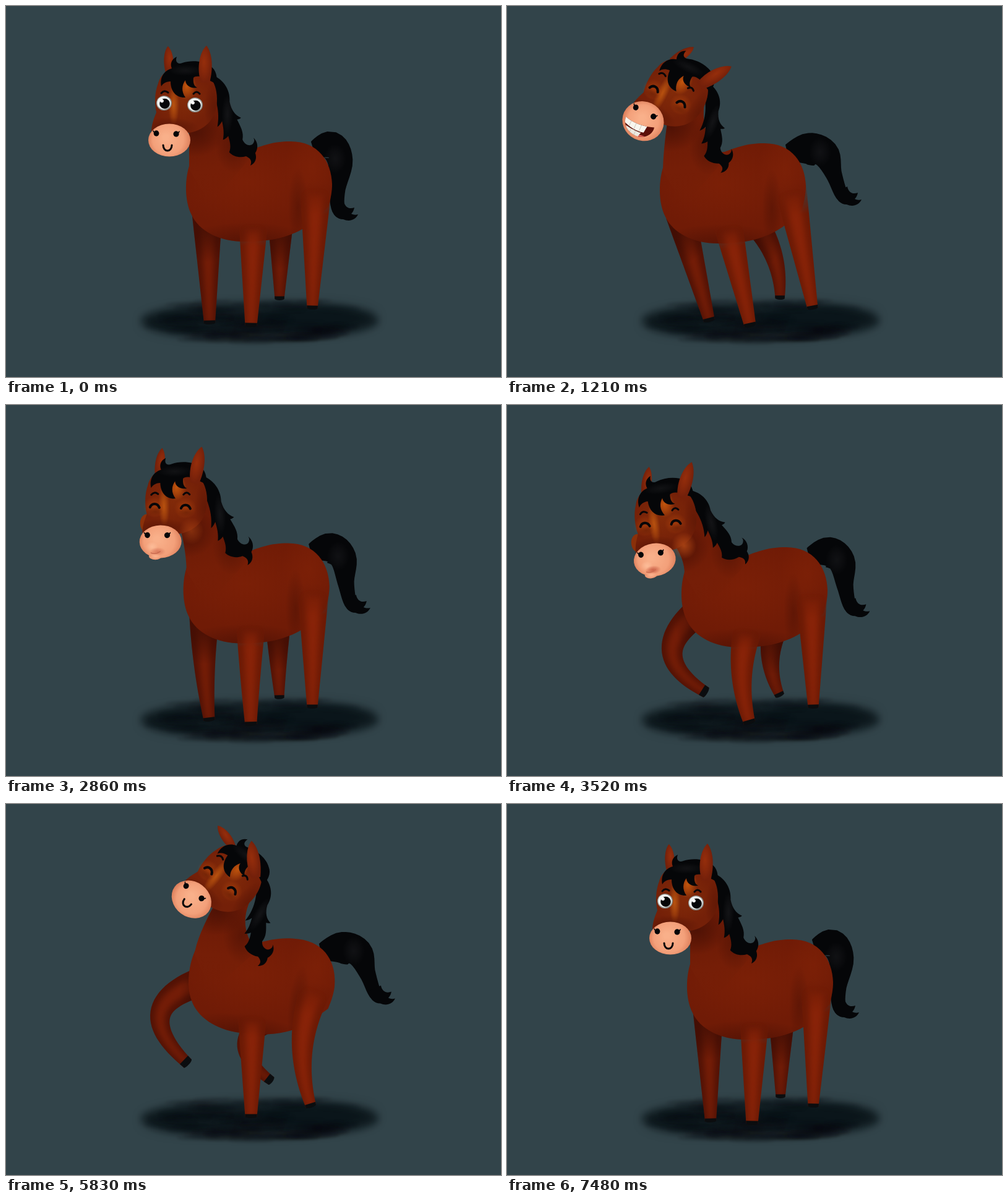
Recreate the animation shown at these times as an HTML page with a canvas. Size 800 by 600 pixels, loop 7590 ms.

```html
<!DOCTYPE html>
<html lang="en">
<head>
<meta charset="utf-8">
<title>Little horse</title>
<style>
html, body { margin: 0; width: 100%; height: 100%; overflow: hidden; background: #32444a; }
canvas { display: block; }
</style>
</head>
<body>
<canvas id="stage" width="800" height="600"></canvas>
<script>
const LOOP = 7590, STEP = 110;
const ctx = document.getElementById('stage').getContext('2d');
const INK = '#050608';
const PIVOT = [470, 300], FACE = [280.5, 158.5];
const MANE_TOP = [340, 120], MANE_END = [385, 235];
const HIPS = { fl: [325, 335], fr: [400, 345], hl: [444, 345], hr: [501, 285] };

// body and head: x, y, degrees; legs: foot x, foot y, bend
const rest = {
  body: [0, 0, 0], head: [280.5, 158.5, 0], ears: [0, 0], mane: [385, 235], tail: [0],
  fl: [329, 513, 0], fr: [396, 517, 0], hl: [442, 474, 0], hr: [495, 489, 0],
  grin: [0], puff: [0]
};
const pose = p => ({ ...rest, ...p });

const lift = pose({ head: [274, 149, 4], ears: [10, 8], body: [-6, -2, 0], tail: [0.45], mane: [379, 232] });
const lean = pose({
  body: [-44, 3, 0], head: [260.5, 143.5, 25.5], ears: [34, 31], mane: [342, 247], tail: [1],
  fl: [327, 509, 0], fr: [393, 517, 0], hl: [441, 473, -12], hr: [494, 489, 0], grin: [1]
});
const back = pose({ body: [-9, 3, 0], head: [267, 153, 10], ears: [20, 16], mane: [375, 238], tail: [0.95] });
const stepRight = pose({
  body: [-9, 11, 0], head: [254, 185, 6], ears: [26, 11], mane: [371, 239], tail: [0.52],
  fl: [325, 506, 16], fr: [389, 483, 44]
});
const between = pose({
  body: [-4, 4, 0], head: [266, 160, -1], ears: [12, 10], mane: [379, 236], tail: [0.5], puff: [0.6]
});
const stepLeft = pose({
  body: [-9, 11, 0], head: [247, 190, -8], ears: [20, 22], mane: [370, 239], tail: [0.55],
  fl: [322, 465, 52], fr: [392, 514, 12], hl: [441, 470, 12], puff: [1]
});
const blow = pose({ body: [0, 5, 0], head: [281, 165, 0], ears: [-30, -12], mane: [385, 240], tail: [0.32], puff: [1] });
const dip = pose({ body: [2, 5, 0], head: [284, 163, 3], ears: [-15, -8], mane: [386, 239], tail: [0.35] });
const rise = pose({
  body: [3, 0, 7], head: [348, 121, 37], ears: [-70, -46], mane: [408, 239], tail: [1],
  fl: [294, 420, 61], fr: [396, 506, 0], hl: [429, 448, 48], hr: [493, 489, 20]
});
const rear = pose({
  body: [2, -6, 26], head: [362, 72, 24], ears: [-22, -18], mane: [420, 180], tail: [0.1],
  fl: [228, 335, 50], fr: [292, 402, 45], hr: [495, 489, 6]
});
const kick = { ...rear, head: [358, 66, 16], fl: [252, 362, 58], fr: [262, 372, 42], tail: [0.2] };
const land = pose({ body: [0, 9, 0], head: [280, 172, -3], ears: [10, 6], mane: [385, 242], tail: [0.22] });

const keys = [
  [0, rest], [110, rest], [330, lift], [770, lean], [1210, lean], [1540, back], [2200, stepRight],
  [2750, between], [3410, stepLeft], [3520, stepLeft], [4070, blow], [4510, blow], [5060, { ...rest, tail: [0.25] }],
  [5500, dip], [5830, rise], [6270, rear], [6600, kick], [6930, rear], [7260, land], [7480, rest], [LOOP, rest]
];

function poseAt(t) {
  let i = 1;
  while (keys[i][0] < t) i++;
  const [t0, a] = keys[i - 1], [t1, b] = keys[i];
  const k = 0.5 - Math.cos(Math.PI * (t - t0) / (t1 - t0)) / 2;
  const out = {};
  for (const n in rest) out[n] = a[n].map((v, j) => v + (b[n][j] - v) * k);
  return out;
}

const rad = d => d * Math.PI / 180;
function place([x, y], [ox, oy], [px, py, deg]) {
  const c = Math.cos(rad(deg)), s = Math.sin(rad(deg)), dx = x - ox, dy = y - oy;
  return [px + dx * c - dy * s, py + dx * s + dy * c];
}
function within(fn) { ctx.save(); fn(); ctx.restore(); }
function enter([ox, oy], [x, y, deg]) {
  ctx.translate(x, y); ctx.rotate(rad(deg)); ctx.translate(-ox, -oy);
}
function glow(x, y, rx, ry, rgb, a) {
  within(() => {
    ctx.translate(x, y); ctx.scale(rx, ry);
    const g = ctx.createRadialGradient(0, 0, 0, 0, 0, 1);
    g.addColorStop(0, `rgba(${rgb},${a})`);
    g.addColorStop(0.5, `rgba(${rgb},${a * 0.55})`);
    g.addColorStop(1, `rgba(${rgb},0)`);
    ctx.fillStyle = g;
    ctx.fillRect(-1, -1, 2, 2);
  });
}
function fillPath(d, color) { ctx.fillStyle = color; ctx.fill(new Path2D(d)); }
function line(d, w, color = INK) {
  ctx.lineWidth = w; ctx.lineCap = 'round'; ctx.strokeStyle = color; ctx.stroke(new Path2D(d));
}
function oval(x, y, rx, ry, color) {
  ctx.fillStyle = color;
  ctx.beginPath(); ctx.ellipse(x, y, rx, ry, 0, 0, 7); ctx.fill();
}

// outline of a ribbon: at(t) gives a centre point, wide(t) its width
function ribbon(at, wide, from = 0, to = 1) {
  const left = [], right = [], n = 30;
  for (let i = 0; i <= n; i++) {
    const t = from + (to - from) * i / n;
    const [x, y] = at(t), [ax, ay] = at(t - 0.004), [bx, by] = at(t + 0.004);
    const l = Math.hypot(bx - ax, by - ay) || 1, h = wide(t) / 2;
    const nx = -(by - ay) / l * h, ny = (bx - ax) / l * h;
    left.push([x + nx, y + ny]);
    right.unshift([x - nx, y - ny]);
  }
  const p = new Path2D();
  left.concat(right).forEach(q => p.lineTo(...q));
  p.closePath();
  return p;
}

function leg(hip, [fx, fy, bend], w0, w1, near) {
  const [hx, hy] = hip, dx = fx - hx, dy = fy - hy, l = Math.hypot(dx, dy);
  const cx = (hx + fx) / 2 - 2 * bend * dy / l, cy = (hy + fy) / 2 + 2 * bend * dx / l;
  const at = t => {
    const u = 1 - t;
    return [u * u * hx + 2 * u * t * cx + t * t * fx, u * u * hy + 2 * u * t * cy + t * t * fy];
  };
  const wide = t => w0 + (w1 - w0) * t;
  const shade = (rgb, a0) => {
    const g = ctx.createLinearGradient(hx, hy, hx + dx * 0.28, hy + dy * 0.28);
    g.addColorStop(0, `rgba(${rgb},${a0})`);
    g.addColorStop(near ? 0.9 : 0.3, `rgb(${rgb})`);
    return g;
  };
  const shape = ribbon(at, wide);
  within(() => {
    ctx.fillStyle = shade(near ? '108,26,5' : '82,18,5', near ? 0 : 1);
    ctx.fill(shape);
    ctx.clip(shape);
    ctx.filter = 'blur(5px)';
    ctx.fillStyle = shade(near ? '136,35,8' : '116,29,7', 0);
    ctx.fill(ribbon(at, t => wide(t) * 0.5, 0.1, 1));
    ctx.filter = 'none';
    if (!near) glow(hx, hy + 25, 45, 55, '45,8,3', 0.6);
  });
  ctx.fillStyle = '#0b0d0f';
  ctx.fill(ribbon(at, wide, 1 - 4.5 / l, 1));
  within(() => {
    ctx.translate(fx, fy);
    ctx.rotate(Math.atan2(fy - cy, fx - cx) - Math.PI / 2);
    oval(0, -0.5, w1 / 2, 2.5, '#0b0d0f');
  });
}

// a raised foreleg pulls its hip up
const raised = ([x, y], foot) => [x, y - Math.min(40, Math.max(0, 510 - foot[1]) * 0.36)];

function tail([bx, by], s) {
  const mix = (x0, y0, x1, y1) => [bx + x0 + (x1 - x0) * s, by + y0 + (y1 - y0) * s];
  const pts = [
    mix(-6, 8, -6, 10), mix(22, 0, 27, 3), mix(37, 26, 55, 12),
    mix(32, 72, 69, 44), mix(34, 105, 82, 78), mix(44, 115, 93, 87)
  ];
  const widths = [28, 45, 41, 27, 20, 10];
  const spline = (get, t) => {
    const v = Math.min(Math.max(t, 0), 0.9999) * 5, i = Math.floor(v), f = v - i;
    const [a, b, c, d] = [i - 1, i, i + 1, i + 2].map(j => get(Math.min(Math.max(j, 0), 5)));
    return b + f * (c - a + f * (2 * a - 5 * b + 4 * c - d + f * (3 * (b - c) + d - a))) / 2;
  };
  const at = t => [spline(i => pts[i][0], t), spline(i => pts[i][1], t)];
  ctx.fillStyle = INK;
  ctx.fill(ribbon(at, t => spline(i => widths[i] + (i && i < 3 ? 6 * s : 0), t)));
  within(() => {
    ctx.translate(...pts[4]);
    fillPath('M9-14C11-4 18-1 26-4C25 1 23 4 21 6C25 8 28 8 32 7C27 17 17 19 8 15C-2 15-9 8-11-5Z', INK);
  });
  glow(pts[2][0] - 8, pts[2][1] - 4, 18, 24, '38,38,42', 0.35);
}

function torso(p) {
  const pos = [PIVOT[0] + p.body[0], PIVOT[1] + p.body[1], p.body[2]];
  within(() => {
    enter(PIVOT, pos);
    const shape = new Path2D('M297 256C289 278 288 315 300 338C312 364 345 381 385 381C430 381 460 374 490 354L521 325C525 310 527 300 527 288C526 252 505 219 460 219C430 219 415 226 395 233L340 238Z');
    ctx.fillStyle = '#701b06';
    ctx.fill(shape);
    ctx.clip(shape);
    glow(390, 285, 120, 75, '138,38,8', 0.4);
    glow(495, 260, 45, 70, '138,38,8', 0.4);
    glow(390, 392, 125, 42, '60,12,4', 0.6);
    glow(472, 325, 16, 65, '70,15,4', 0.4);
  });
  const b = q => place(q, PIVOT, pos), h = q => place(q, FACE, p.head);
  const a = h([296, 192]), top = h([336, 135]), crown = h([295, 150]);
  const throat = b([296, 235]), chest = b([296, 264]), deep = b([330, 320]), wither = b([395, 246]), nape = b([352, 205]);
  const neck = new Path2D();
  neck.moveTo(...crown);
  neck.lineTo(...a);
  neck.quadraticCurveTo(...throat, ...chest);
  neck.lineTo(...deep);
  neck.lineTo(...wither);
  neck.quadraticCurveTo(...nape, ...top);
  within(() => {
    const g = ctx.createLinearGradient(...a, ...deep);
    g.addColorStop(0, '#6a1a06');
    g.addColorStop(0.6, '#751e07');
    g.addColorStop(1, 'rgba(117,30,7,0)');
    ctx.fillStyle = g;
    ctx.fill(neck);
    ctx.clip(neck);
    glow(...h([306, 204]), 48, 40, '60,12,4', 0.6);
    glow(...b([368, 225]), 30, 45, '70,15,4', 0.5);
  });
}

function mane(p) {
  const [tx, ty] = place(MANE_TOP, FACE, p.head), [ex, ey] = p.mane;
  const vx = MANE_END[0] - MANE_TOP[0], vy = MANE_END[1] - MANE_TOP[1];
  within(() => {
    ctx.translate(tx, ty);
    ctx.rotate(Math.atan2(ey - ty, ex - tx));
    ctx.scale(Math.hypot(ex - tx, ey - ty) / Math.hypot(vx, vy), 1.06);
    ctx.rotate(-Math.atan2(vy, vx));
    ctx.translate(-MANE_TOP[0], -MANE_TOP[1]);
    fillPath('M326 108C350 116 362 135 361 155C364 169 370 177 379 181C376 184 374 183 373 184C379 196 384 205 382 216C386 226 396 228 399 222C401 218 400 215 398 213C406 219 407 231 402 238C405 246 403 254 395 258C398 250 394 246 388 243C378 246 368 243 362 236C365 228 363 220 360 210C358 213 355 215 352 216C354 204 352 196 350 186C348 190 346 193 343 195C348 165 336 140 328 125Z', INK);
    glow(358, 175, 9, 32, '45,45,48', 0.35);
  });
}

function ear(x, y, size, deg) {
  within(() => {
    ctx.translate(x, y); ctx.rotate(rad(deg)); ctx.scale(size, Math.abs(size));
    const shape = new Path2D('M-7 3C-15-22-8-48 2-57C12-44 13-20 7 3Z');
    ctx.fillStyle = '#74200a';
    ctx.fill(shape);
    ctx.clip(shape);
    glow(-2, -30, 12, 32, '160,50,12', 0.75);
  });
}

function eye(x, y, open) {
  if (open) {
    oval(x, y, 12.5, 12, '#8f9491');
    oval(x - 0.3, y - 0.3, 11, 10.5, '#f3f4f2');
    oval(x + 1, y + 1, 8.3, 8.3, INK);
    oval(x - 3.5, y - 3.5, 2.8, 2.8, '#fff');
  } else {
    glow(x, y + 4, 18, 17, '185,72,12', 0.55);
    glow(x + 1, y + 11, 13, 7, '80,20,4', 0.4);
    line(`M${x - 7} ${y + 4}C${x - 4} ${y - 3} ${x + 5} ${y - 3} ${x + 8} ${y + 5}`, 4);
  }
}

function muzzle(grin, puff, up) {
  const ry = 26.5 + 2 * up + 3.5 * grin, cy = 217 - 3 * up;
  const g = ctx.createRadialGradient(258, cy - 4, 4, 264, cy, 36);
  g.addColorStop(0, '#f9b08a');
  g.addColorStop(0.65, '#f3a07a');
  g.addColorStop(1, '#db7c58');
  if (puff > 0.3) oval(255, 240, 10.5, 6, '#eb9672');
  ctx.fillStyle = g;
  ctx.beginPath(); ctx.ellipse(264 - 2 * up, cy, 34, ry, 0, 0, 7); ctx.fill();
  const ny = 206 - 4 * up - 3 * grin;
  oval(243 - up, ny, 4.4, 4.7, INK);
  oval(275 - up, ny + 1, 4.6, 4.7, INK);
  line(`M${240 - up} ${ny - 1}l-2-3M${278 - up} ${ny}l2-3`, 1.6);
  if (puff > 0.3) {
    glow(250, 225, 10, 8, '255,195,160', 0.75);
    glow(259, 233, 13, 7, '190,75,55', 0.75 * puff);
    glow(255, 241, 9, 5, '255,185,150', 0.8);
    line('M248 235Q256 238 263 233', 1.5, '#c96b50');
  } else if (grin > 0.3) {
    within(() => {
      ctx.translate(260, 222); ctx.scale(1, grin); ctx.translate(-260, -222);
      const mouth = new Path2D('M234 220C248 224 266 223 283 216C286 227 277 240 262 241C246 241 236 233 234 220Z');
      ctx.clip(mouth);
      ctx.fillStyle = '#5c1009';
      ctx.fillRect(230, 208, 60, 40);
      oval(273, 241, 12, 5, '#d9605a');
      fillPath('M233 218C248 223 262 223 272 219L271 231C258 234 245 232 235 228Z', '#f8f6ef');
      fillPath('M240 232C250 234 260 234 267 233L265 241C257 243 249 242 243 238Z', '#ece9e1');
      line('M245 221v10M254 222v11M263 221v11M250 234v6M258 234v7', 0.8, '#c5bfb3');
    });
  } else {
    within(() => {
      ctx.translate(-1.5 * up, -4.5 * up);
      line('M254 225C254 237 268 237 268 225', 3);
    });
  }
}

function head(p, open) {
  const up = Math.min(1, Math.max(0, p.head[2] / 30));
  within(() => {
    enter(FACE, p.head);
    ear(263, 106, -0.72, p.ears[0]);
    if (p.puff[0] > 0) oval(246 - 5 * p.puff[0], 187, 11, 15, '#8a3009');
    const face = new Path2D('M246 125C240 140 240 158 243 172C240 180 236 188 235 202L296 205C325 200 341 180 341 150C341 122 325 98 290 96C265 96 250 110 246 125Z');
    ctx.fillStyle = '#742008';
    ctx.fill(face);
    within(() => {
      ctx.clip(face);
      glow(285, 150, 48, 45, '150,58,10', 0.4);
      glow(292, 130, 16, 22, '215,100,14', 0.75);
      glow(271, 160, 9, 34, '215,105,18', 0.65);
      glow(264, 198, 48, 18, '75,16,4', 0.6);
      glow(338, 165, 18, 45, '80,18,4', 0.5);
    });
    if (p.puff[0] > 0) glow(314, 201, 20, 22, '172,68,20', 0.9 * p.puff[0]);
    eye(255.5, 157, open);
    eye(305.5, 160, open);
    within(() => {
      ctx.translate(2 * up, -8 * up);
      line('M251 141Q256 135 262 140', 3);
      line('M303 142Q308 136 313 142', 3);
    });
    fillPath('M251 130C248 115 256 104 268 101C265 94 267 86 276 82C273 90 277 95 285 92C300 87 320 89 330 97C340 103 342 115 340 126L330 121C318 113 306 112 303 116C302 124 304 130 309 132C298 134 290 128 290 120C284 128 283 138 290 148C276 149 266 139 266 122C258 122 253 126 251 130Z', INK);
    glow(290, 104, 28, 9, '45,45,48', 0.3);
    ear(322, 121, 1, p.ears[1]);
    muzzle(p.grin[0], p.puff[0], up);
  });
}

function makeShadow() {
  const layer = document.createElement('canvas');
  layer.width = 800; layer.height = 600;
  const c = layer.getContext('2d');
  let seed = 7;
  const rnd = () => (seed = seed * 16807 % 2147483647) / 2147483647;
  const blob = (x, y, rx, ry, blur, a) => {
    c.filter = `blur(${blur}px)`;
    c.fillStyle = `rgba(4,13,17,${a})`;
    c.beginPath(); c.ellipse(x, y, rx, ry, 0, 0, 7); c.fill();
  };
  blob(410, 509, 192, 31, 6, 0.55);
  blob(310, 511, 88, 20, 9, 0.5);
  blob(495, 505, 102, 21, 9, 0.65);
  for (let i = 0; i < 90; i++) {
    const y = 477 + rnd() * 66, reach = 1 - Math.abs(y - 507) / 75;
    blob(410 + (rnd() - 0.5) * 350 * reach, y, 18 + rnd() * 30, 2 + rnd() * 4, 2, 0.15);
  }
  return layer;
}
const shadow = makeShadow();

function draw(t) {
  const p = poseAt(t);
  const pos = [PIVOT[0] + p.body[0], PIVOT[1] + p.body[1], p.body[2]];
  const onBody = q => place(q, PIVOT, pos);
  ctx.fillStyle = '#32444a';
  ctx.fillRect(0, 0, 800, 600);
  ctx.drawImage(shadow, 0, 0);
  tail(onBody([503, 225]), p.tail[0]);
  leg(onBody(HIPS.hl), p.hl, 42, 15, false);
  leg(raised(onBody(HIPS.fl), p.fl), p.fl, 49, 18, false);
  torso(p);
  leg(onBody(HIPS.hr), p.hr, 53, 17, true);
  leg(raised(onBody(HIPS.fr), p.fr), p.fr, 48, 19, true);
  mane(p);
  head(p, t < 330 || t >= 7370);
}

function tick(now) {
  draw(Math.floor(now % LOOP / STEP) * STEP);
  requestAnimationFrame(tick);
}
draw(0);
requestAnimationFrame(tick);
</script>
</body>
</html>
```
